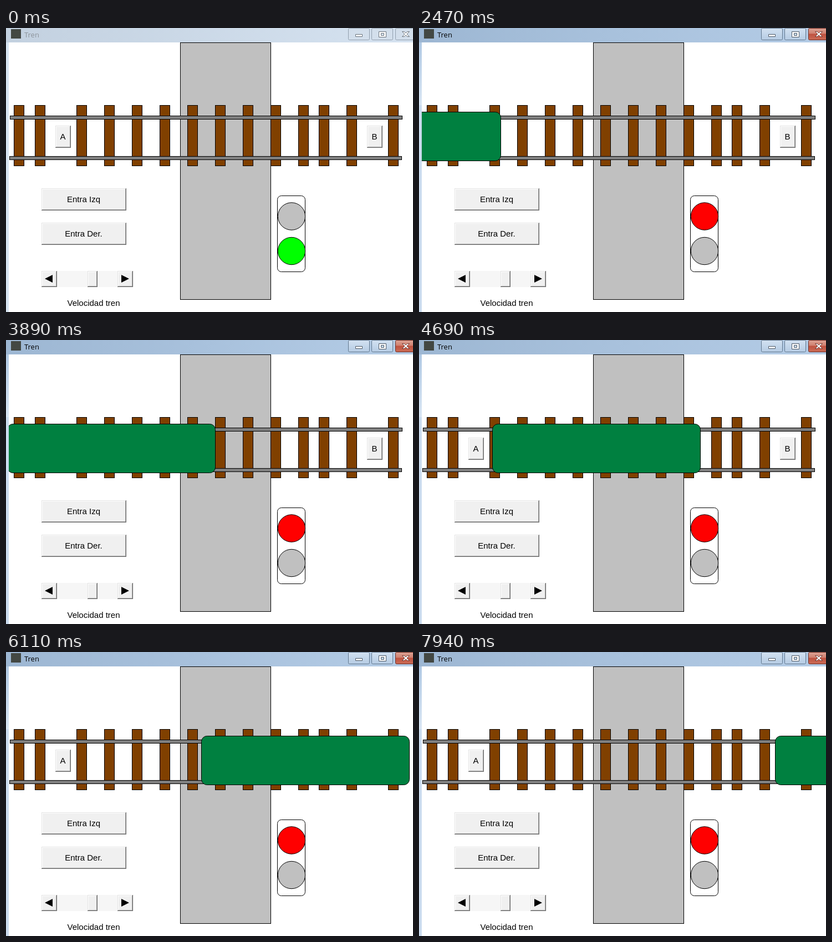
An HTML page that plays this animation: 734x512 px, repeating every 8000 ms.

```html
<!DOCTYPE html>
<html lang="es">
<head>
<meta charset="utf-8">
<title>Tren</title>
<style>
  html, body { margin: 0; width: 100%; height: 100%; overflow: hidden; background: #fff; }
  svg { display: block; width: 734px; height: 512px; }
  text { font: 15px "Liberation Sans", Arial, sans-serif; text-anchor: middle; }
  #caption { font: 13px "Open Sans", "Noto Sans", sans-serif; text-anchor: start; fill: #8d949b; }
  .line { stroke: #000; }
  .on { display: none; }
  .active .on { display: inline; }
  .active .off { display: none; }
  .active #caption { fill: #000; }
</style>
</head>
<body>
<svg id="stage" viewBox="0 0 734 512">
  <defs>
    <linearGradient id="barOn"><stop stop-color="#9db7d3"/><stop offset="1" stop-color="#b4cce6"/></linearGradient>
    <linearGradient id="barOff"><stop stop-color="#c3d1e0"/><stop offset="1" stop-color="#d5e2f0"/></linearGradient>
    <linearGradient id="edge" x2="0" y2="1"><stop stop-color="#b0c9e4"/><stop offset="1" stop-color="#d9e6f4"/></linearGradient>
    <linearGradient id="red" x2="0" y2="1"><stop stop-color="#dea496"/><stop offset=".45" stop-color="#d0806f"/><stop offset=".5" stop-color="#bf5240"/><stop offset="1" stop-color="#cc6c56"/></linearGradient>
    <linearGradient id="blue" x2="0" y2="1"><stop stop-color="#d3e2f2"/><stop offset="1" stop-color="#b5cbe3"/></linearGradient>
    <clipPath id="client"><rect x="5" y="26" width="729" height="486"/></clipPath>
  </defs>
  <rect width="734" height="512" fill="#fff"/>
  <rect width="5" height="512" fill="#d7e4f2"/>
  <rect class="on" y="139" width="5" height="373" fill="#cbdcef"/>
  <rect class="on" y="26" width="5" height="113" fill="url(#edge)"/>
  <rect class="off" width="734" height="26" fill="url(#barOff)"/>
  <rect class="on" width="734" height="26" fill="url(#barOn)"/>
  <rect x="9" y="2" width="18" height="17" fill="#434843"/>
  <text id="caption" x="33" y="16.5">Tren</text>
  <g id="chrome"></g>
  <g clip-path="url(#client)">
    <g id="scene"></g>
    <rect id="train" class="line" y="151.5" width="375" height="88" rx="10" fill="#008040"/>
  </g>
  <path id="cursor" d="M.5 .5V16.5L4.2 13L7 19H9.5L6.8 12H11.8Z" fill="#fff" stroke="#000"/>
</svg>
<script>
const $ = id => document.getElementById(id);
const scene = $("scene"), chrome = $("chrome");

function add(parent, tag, attrs, label) {
  const el = document.createElementNS("http://www.w3.org/2000/svg", tag);
  for (const k in attrs) el.setAttribute(k, attrs[k]);
  if (label) el.textContent = label;
  return parent.appendChild(el);
}
const box = (x, y, width, height, fill, more) =>
  add(scene, "rect", { x, y, width, height, fill, ...more });
const outlined = (x, y, w, h, fill, more) =>
  box(x + .5, y + .5, w, h, fill, { class: "line", ...more });

// Raised 3D button
function button(x, y, w, h, label) {
  box(x, y, w, h, "#696969");
  box(x, y, w - 1, h - 1, "#e3e3e3");
  box(x + 1, y + 1, w - 2, h - 2, "#a0a0a0");
  box(x + 1, y + 1, w - 3, h - 3, "#fff");
  box(x + 2, y + 2, w - 4, h - 4, "#f0f0f0");
  if (label) add(scene, "text", { x: x + w / 2 - .5, y: y + h / 2 + 5 }, label);
}

// Road and track
outlined(314, 26, 163, 463, "#c0c0c0");
const sleeper = x => outlined(x, 139, 18, 109, "#804000");
[14, 52, 564, 614, 689].forEach(sleeper);
for (let x = 127; x <= 527; x += 50) sleeper(x);
outlined(7, 158, 707, 6, "#808080");
outlined(6, 231, 707, 6, "#808080");

// Controls
button(89, 176, 28, 40, "A");
button(651, 176, 28, 40, "B");
button(64, 289, 153, 40, "Entra Izq");
button(64, 351, 153, 40, "Entra Der.");
box(64, 438, 166, 29, "#f6f6f6");
button(64, 438, 28, 29);
button(147, 438, 18, 29);
button(201, 438, 28, 29);
add(scene, "path", { d: "M70 452L84 445V459ZM222 452L208 445V459Z" });
add(scene, "text", { x: 158, y: 501 }, "Velocidad tren");

// Traffic light
outlined(489, 302, 50, 137, "#fff", { rx: 7 });
const lamp = cy => add(scene, "circle", { cx: 515, cy, r: 24.7, class: "line" });
const stop = lamp(339.5), go = lamp(402);

// Caption buttons for both window states
function captionButton(x, onFill, glyph, onStroke, onGlyph) {
  for (const state of ["off", "on"]) {
    const on = state === "on", g = add(chrome, "g", { class: state });
    add(g, "rect", { x: x + .5, y: .5, width: 38, height: 21, rx: 2,
      fill: on ? onFill : "#d3dfec", stroke: on ? onStroke : "#929fae" });
    add(g, "path", { d: glyph, "fill-rule": "evenodd", fill: "#fff",
      stroke: on ? onGlyph : "#69727c" });
  }
}
captionButton(617, "url(#blue)", "M630.5 11.5h12v4h-12Z", "#62788f", "#4d5967");
captionButton(659, "url(#blue)", "M672.5 6.5h13v10h-13Zm4 3h5v4h-5Z", "#62788f", "#4d5967");
captionButton(702, "url(#red)",
  "M714.5 6.5H718L721 9L724 6.5H727.5L723 11L727.5 15.5H724L721 13L718 15.5H714.5L719 11Z",
  "#6f2a22", "#713d38");

const LOOP = 8000, ACTIVATE = 740, RED = 2000;

// The train jumps in whole 10 px moves, seen once per refresh
const REFRESH = 201.5, MOVES = 3.23;
const trainLeft = t => -228 + 10 * Math.round(MOVES * Math.floor((t - 2470) / REFRESH));

// Pointer: up to the button, rest, then away; time, x, y
const path = [[320, 84, 520], [740, 128, 318], [1160, 128, 318], [1470, 106, 427], [1680, 90, 530]];

function pointer(t) {
  const held = Math.floor(t / 70) * 70;
  const i = path.findIndex(p => p[0] > held);
  if (i < 1) return [0, 600];
  const [t0, x0, y0] = path[i - 1], [t1, x1, y1] = path[i];
  const k = (held - t0) / (t1 - t0);
  return [Math.round(x0 + (x1 - x0) * k), Math.round(y0 + (y1 - y0) * k)];
}

function draw(t) {
  $("stage").classList.toggle("active", t >= ACTIVATE);
  $("train").setAttribute("x", trainLeft(t) + .5);
  $("cursor").setAttribute("transform", `translate(${pointer(t)})`);
  stop.setAttribute("fill", t >= RED ? "#f00" : "#c0c0c0");
  go.setAttribute("fill", t >= RED ? "#c0c0c0" : "#0f0");
}

const start = performance.now();
function tick() {
  draw((performance.now() - start) % LOOP);
  requestAnimationFrame(tick);
}
tick();
</script>
</body>
</html>
```
